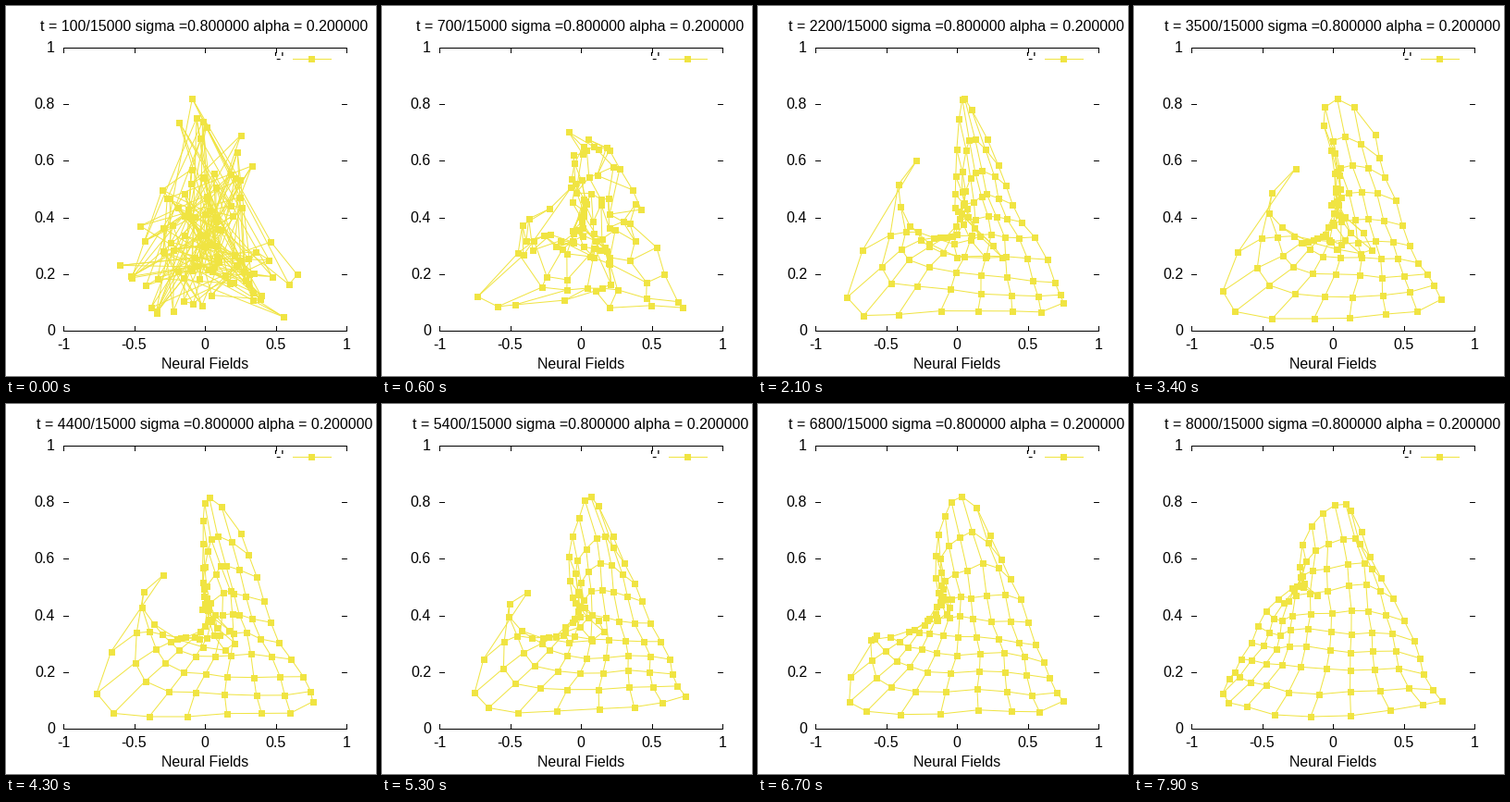
Animation of 400x400 px, one loop 8000 ms. Source, as a matplotlib script:

```python
import numpy as np
import matplotlib.pyplot as plt
from matplotlib.animation import FuncAnimation
from matplotlib.collections import LineCollection

FRAMES, SIZE, N = 80, 400, 10
GOLD = "#f0e442"
LEFT, RIGHT, TOP, BOTTOM = 62, 368, 45, 351

plt.rcParams["font.family"] = "Liberation Sans"
fig = plt.figure(figsize=(4, 4), dpi=100, facecolor="white")
ax = fig.add_axes([0, 0, 1, 1])
ax.set(xlim=(0, SIZE), ylim=(SIZE, 0))
ax.axis("off")

rng = np.random.default_rng(12)


def curve(*points):
    """N places along a smooth curve through evenly spaced points."""
    s = np.linspace(0, 1, len(points))
    u = np.linspace(0, 1, N)
    xy = np.array(points, float).T
    return np.stack([np.polyval(np.polyfit(s, c, len(s) - 1), u)
                     for c in xy], axis=1)


def elastic_net(crest_bend, cleft, notch, flank, arm):
    """Lattice hung in its four sides, each inner cell amid its neighbours."""
    shoulder, foot = (250, 140), (332, 322)
    net = np.full((N, N, 2), (215.0, 250.0))
    net[0] = curve(shoulder, (213, 104), crest_bend, cleft)
    net[:, 0] = curve(shoulder, (280, 212), (310, 275), foot)
    net[-1] = curve(foot, (265, 334), (172, 337), (102, 322), arm)
    net[:, -1] = curve(cleft, notch, flank, arm)
    for _ in range(400):
        net[1:-1, 1:-1] = (net[:-2, 1:-1] + net[2:, 1:-1]
                           + net[1:-1, :-2] + net[1:-1, 2:]) / 4
    return net


cloven = elastic_net((212, 175), (215, 222), (245, 270), (165, 238), (178, 170))
healed = elastic_net((181, 150), (196, 208), (158, 213), (127, 262), (100, 300))

corners = np.array([(215, TOP), (LEFT, BOTTOM), (RIGHT, BOTTOM)])
scatter = rng.dirichlet((2, 2.2, 2.2), (N, N)) @ corners
fade = rng.uniform(220, 430, (N, N, 1))


def wander():
    """Slow drift shared by neighbouring cells, one field per frame."""
    d = np.subtract.outer(np.arange(N), np.arange(N))
    k = np.exp(-d**2 / (2 * 0.8**2))
    k /= np.sqrt((k**2).sum(1, keepdims=True) if False else
                 (k**2).sum(1, keepdims=True))
    field, out = np.zeros((N, N, 2)), []
    for _ in range(FRAMES):
        kick = np.einsum("ia,jb,abk->ijk", k, k, rng.normal(size=(N, N, 2)))
        field = 0.75 * field + 0.66 * kick
        out.append(field)
    return out


drift = wander()


def cells(frame):
    t = 100 * (frame + 1)
    heal = np.clip((t - 2200) / 5800, 0, 1) ** 2.2
    pose = cloven + heal * (healed - cloven)
    chaos = np.exp(-(t - 100) / fade)
    sway = 3 + 7 * np.exp(-t / 1200)
    p = pose + chaos * (scatter - pose) + sway * (1 - chaos) * drift[frame]
    return np.clip(p, (96, 100), (336, 338))


def stroke(xs, ys, color="black"):
    ax.plot(xs, ys, color=color, lw=0.72, antialiased=False)


def label(x, y, s, ha="center"):
    return ax.text(x, y, s, fontsize=11.55, ha=ha, va="baseline")


def squares(x, y):
    return ax.plot(x, y, "s", ms=5.04, mew=0, color=GOLD)[0]


for edge, tick in [(TOP, 5), (BOTTOM, -5)]:
    stroke([LEFT, RIGHT], [edge, edge])
    for x in np.linspace(LEFT, RIGHT, 5):
        stroke([x, x], [edge, edge + tick])
for edge, tick in [(LEFT, 5), (RIGHT, -5)]:
    for y in np.linspace(TOP, BOTTOM, 6):
        stroke([edge, edge + tick], [y, y])
for v in np.linspace(-1, 1, 5):
    label(215 + 153 * v, 371, f"{v:g}")
for v in np.linspace(0, 1, 6):
    label(53, BOTTOM + 5 - 306 * v, f"{v:g}", "right")
label(215, 392, "Neural Fields")
label(301, 62, "'-'", "right")
stroke([310, 351], [57, 57], GOLD)
squares([330], [57])

title = label(214.5, 27, "")
threads = ax.add_collection(
    LineCollection([], colors=GOLD, linewidths=0.72))
dots = squares([], [])


def draw(frame):
    p = cells(frame)
    title.set_text(f"t = {100 * (frame + 1)}/15000 "
                   "sigma =0.800000 alpha = 0.200000")
    threads.set_segments([*p, *p.swapaxes(0, 1)])
    dots.set_data(p[..., 0].ravel(), p[..., 1].ravel())
    return title, threads, dots


anim = FuncAnimation(fig, draw, frames=FRAMES, interval=100, repeat=True,
                     repeat_delay=0, blit=False)
plt.show()
```
